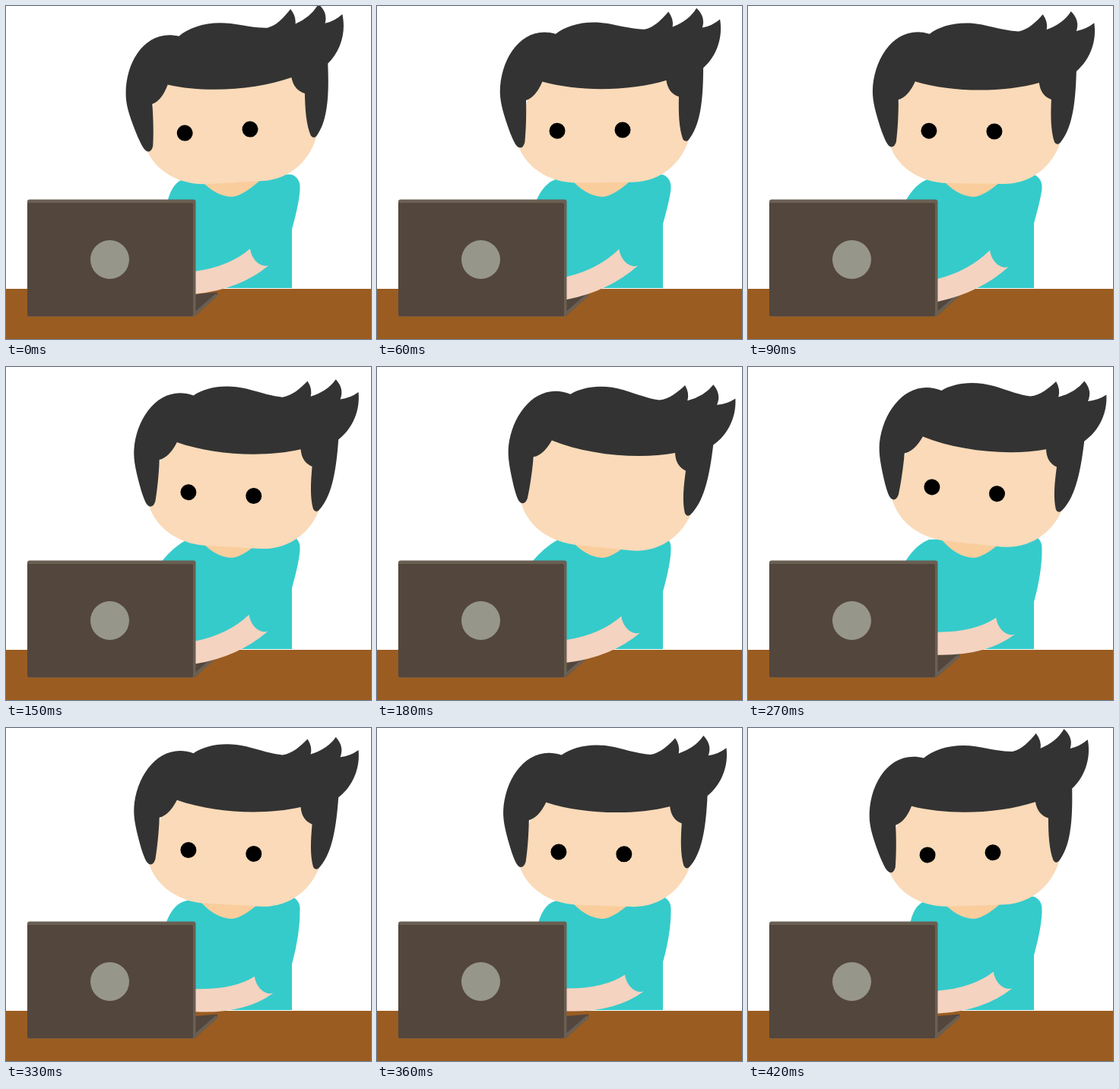
These frames come from a looping animation (480 by 438 pixels, 0.45 s). An HTML page:

```html
<!DOCTYPE html>
<html lang="en">
<head>
<meta charset="utf-8">
<title>Typing at a laptop</title>
<style>
  html, body { margin: 0; width: 100%; height: 100%; overflow: hidden; background: #fff; }
  svg { display: block; width: 480px; height: 438px; }
</style>
</head>
<body>
<svg viewBox="0 0 480 438">
  <path id="shirt" fill="#35cbcb"/>
  <path fill="#facd9d" d="M252 224C266 242 283 251 297 251Q313 250 342 222Z"/>
  <g id="head">
    <path fill="#fadab8" d="M184 174C192 211 226 232 262 233L336 234C374 234 402 209 412 176L402 90H210Z"/>
    <path fill="#333" d="M189 185C184 185 181 178 176 165C168 141 164 126 164 112C165 66 196 23 239 36.5
      C254 25 280 19 308 24.5C328 29 343 33 356 33.5C369 31 379 21 388 11Q395 21 393 31Q415 23 425 7
      Q437 19 432 33Q445 31 455.5 22.5C459 45 451 70 432 86C431 121 428 158 412 178Q407 185 403 179
      C398 164 398 144 399 123Q385 118 383 101C336 114 269 114 220 99Q211 119 198 123
      C198 143 197 162 195 178Q193 185 189 185Z"/>
    <g id="eyes"><circle cx="238" cy="164" r="10.5"/><circle cx="324" cy="165" r="10.5"/></g>
  </g>
  <path fill="#9a5c21" d="M0 372H480V438H0Z"/>
  <path fill="#53463d" d="M248 379L278 376.5V381L248 408Z"/>
  <path fill="none" stroke="#6a5f53" stroke-width="4" d="M277.5 379.5L247 406"/>
  <path id="arm" fill="#f4d3c0"/>
  <rect x="28" y="254.5" width="221.5" height="154" rx="3" fill="#6a5f53"/>
  <path fill="#53463d" d="M28 259H244Q246 259 246 261V406Q246 408 244 408H30Q28 408 28 406Z"/>
  <circle cx="136.5" cy="333.5" r="25.5" fill="#97968a"/>
</svg>
<script>
const STEP = 30, STEPS = 15, RAD = Math.PI / 180;
const $ = id => document.getElementById(id);

function draw(step) {
  const turn = step / STEPS * 360;
  const wave = (mean, swing, peak) => mean + swing * Math.cos((turn - peak) * RAD);

  // The head rocks to and fro in equal notches
  const notch = Math.max(0, Math.round(8.7 - 1.21 * Math.abs(step - 7.8)));
  const tilt = 1.31 * notch - 4;
  const bob = 1.2 * Math.sin(turn * RAD) - 1.8 * Math.sin(2 * turn * RAD);
  $('head').setAttribute('transform', `translate(0 ${bob}) rotate(${tilt} 280.5 206)`);
  $('eyes').style.display = step === 6 || step === 7 ? 'none' : '';

  const shoulder = wave(208.6, 4.7, 328), sleeve = wave(298.5, 12.5, 248);
  $('shirt').setAttribute('d', `M${shoulder} 256Q220 ${441 - shoulder} 238 227L372 221.5
    C380 221 387 229 386.5 238Q387 ${sleeve - 40} 376 ${sleeve}V371H${shoulder}Z`);

  // Upper edge of the forearm, rounded cuff, lower edge
  const wrist = wave(351.5, 9, 108), low = wrist + 30;
  const x = wave(322.5, 4.5, 250), y = wave(324.5, 5.5, 198), end = y + 22;
  $('arm').setAttribute('d', `M245 ${wrist + 1}L250 ${wrist}
    Q${x - 27} ${wrist + 10 - .55 * (wrist - y)} ${x} ${y}
    C${x + 2} ${y + 14} ${x + 13} ${y + 25} ${x + 24.5} ${end}
    Q${x - 13} ${low + 20 - .7 * (low - end)} 250 ${low}H245Z`);
}

function tick(now) {
  draw(Math.floor(now / STEP) % STEPS);
  requestAnimationFrame(tick);
}
draw(0);
requestAnimationFrame(tick);
</script>
</body>
</html>
```
